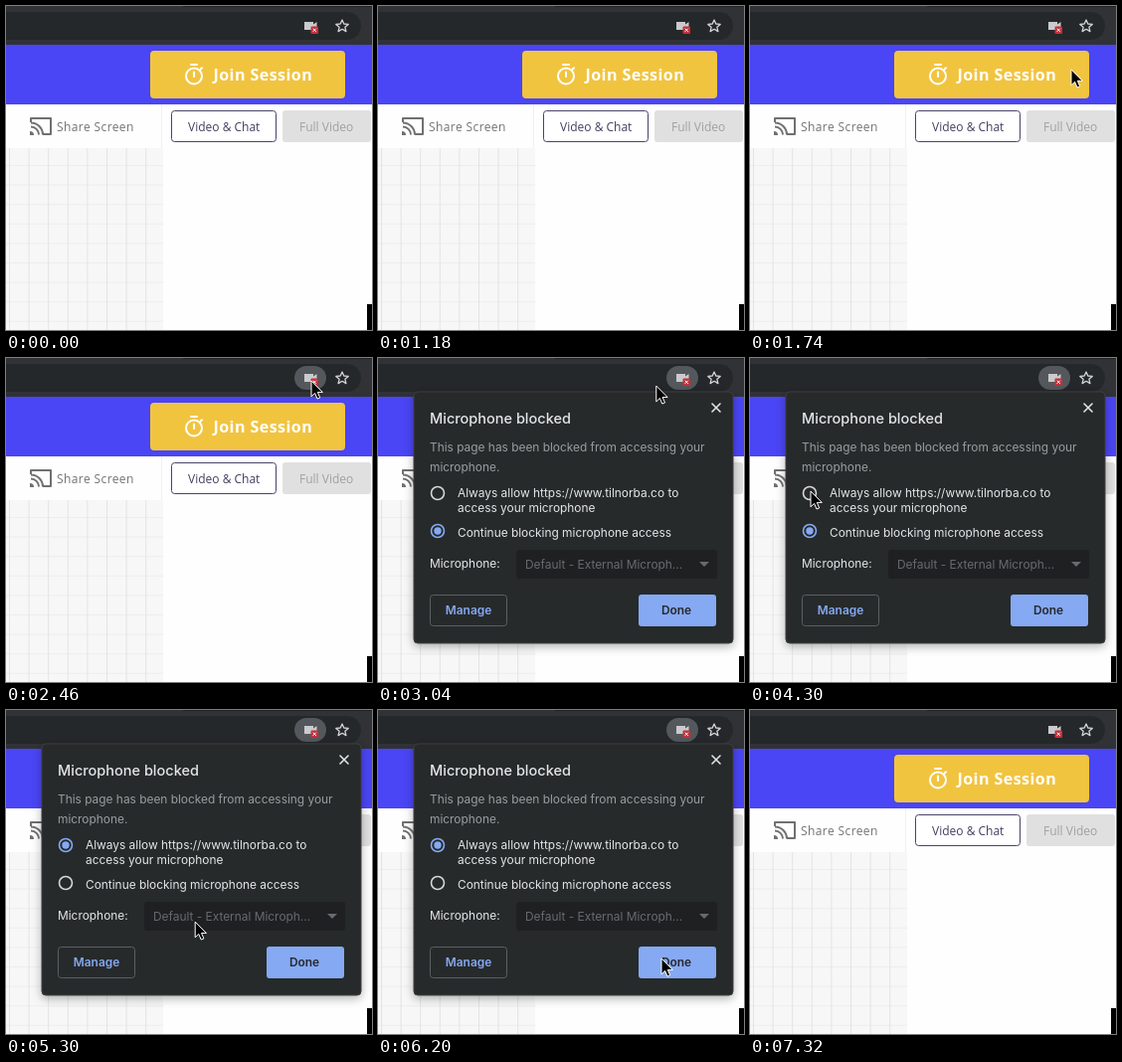
Write an HTML page that moves like this. It is 368 px wide and 326 px high and loops after 8740 ms.

```html
<!DOCTYPE html>
<html lang="en">
<head>
<meta charset="utf-8">
<title>Microphone permission</title>
<style>
html, body { margin: 0; width: 100%; height: 100%; overflow: hidden; background: #fff; }
svg { display: block; }
.page { font: 12px "Open Sans", sans-serif; }
.dialog { font: 11.9px Inter, "Liberation Sans", sans-serif; fill: #e4e6e9; }
.line { fill: none; stroke-linecap: round; stroke-linejoin: round; }
</style>
</head>
<body>
<svg width="368" height="326" viewBox="0 0 368 326">
  <defs>
    <pattern id="grid" x="3" y="140.4" width="19.6" height="19.6" patternUnits="userSpaceOnUse">
      <path d="M.5 0V19.6M0 .1H19.6" stroke="#e3e3e3"/>
    </pattern>
    <filter id="shadow" x="-20%" y="-20%" width="140%" height="140%">
      <feDropShadow dx="0" dy="3" stdDeviation="5" flood-opacity=".3"/>
    </filter>
  </defs>

  <g class="page">
    <rect width="368" height="326" fill="#fefefe"/>
    <rect y="143" width="158" height="183" fill="#f7f7f7"/>
    <rect y="143" width="158" height="183" fill="url(#grid)"/>
    <path d="M156.5 99V143" stroke="#f0f0f0"/>
    <rect y="38" width="368" height="61" fill="#4a45f5"/>
    <rect width="368" height="39" fill="#303236"/>
    <rect x="-20" y="6" width="377" height="28" rx="14" fill="#25282a"/>
    <path d="M178 .5H368" stroke="#1f2123"/>

    <rect x="145" y="45" width="196" height="48" rx="4" fill="#f1c440"/>
    <g class="line" stroke="#fff" stroke-width="2">
      <circle cx="189" cy="70.5" r="8"/>
      <path d="M186 59H192M189 66.5V71M195.3 64L197 62.3"/>
    </g>
    <text x="208.500" y="75" font-size="16" font-weight="700" letter-spacing=".45" fill="#fff">Join Session</text>

    <g class="line" stroke="#707070" stroke-width="2" style="stroke-linecap:butt">
      <path d="M25 117V113H45V129H37M25 121.500A8 8 0 0 1 33 129.500M25 117.500A12 12 0 0 1 37 129.500"/>
    </g>
    <path d="M24 126A4 4 0 0 1 28 130H24Z" fill="#707070"/>
    <text x="51" y="126" letter-spacing=".4" fill="#737373">Share Screen</text>

    <rect x="166.500" y="105.500" width="105" height="31" rx="3" fill="#fff" stroke="#45436b"/>
    <text x="183" y="126" fill="#434160">Video &amp; Chat</text>
    <rect x="278" y="105" width="89" height="32" rx="3" fill="#e0e0e0"/>
    <text x="295" y="126" fill="#a0a0a0">Full Video</text>
    <rect x="363" y="300" width="5" height="26"/>
  </g>

  <rect id="halo" x="290" y="8" width="32" height="24" rx="12" fill="#54575b"/>
  <path d="M300 16H309V18.500L312.500 16V24L309 22V24H300Z" fill="#c9cbce"/>
  <rect x="306.500" y="20.500" width="7.500" height="7.500" rx="1" fill="#c9303a"/>
  <path d="M308.700 22.700L311.800 25.800M311.800 22.700L308.700 25.800" stroke="#fff"/>
  <path class="line" d="M338 14L339.800 18 344.200 18.400 340.900 21.300 341.900 25.600 338 23.300 334.100 25.600 335.100 21.300 331.800 18.400 336.200 18Z" stroke="#d3d5d8" stroke-width="1.300"/>

  <g id="dialog" class="dialog">
    <rect x="36" y="34" width="321" height="253" rx="4" fill="#26292c" stroke="#3b3e41" filter="url(#shadow)"/>
    <path class="line" d="M336 46L344 54M344 46L336 54" stroke="#e4e6e9" stroke-width="1.600"/>
    <text x="52" y="66" font-size="14.500" font-weight="500">Microphone blocked</text>
    <g fill="#989da2">
      <text x="52" y="94">This page has been blocked from accessing your</text>
      <text x="52" y="114">microphone.</text>
    </g>
    <text x="80" y="140">Always allow https://www.tilnorba.co to</text>
    <text x="80" y="155">access your microphone</text>
    <text x="80" y="180">Continue blocking microphone access</text>
    <g fill="none" stroke-width="1.600">
      <circle id="allowRing" cx="60" cy="136" r="6.500"/>
      <circle id="blockRing" cx="60" cy="174" r="6.500"/>
    </g>
    <circle id="allowDot" cx="60" cy="136" r="3.700" fill="#86a9f3"/>
    <circle id="blockDot" cx="60" cy="174" r="3.700" fill="#86a9f3"/>
    <text x="52" y="211">Microphone:</text>
    <rect x="139" y="193" width="202" height="29" rx="3" fill="#1e2022"/>
    <text x="148" y="212" fill="#686b6e">Default - External Microph...</text>
    <path d="M323 205H333L328 210Z" fill="#686b6e"/>
    <rect x="52.500" y="238.500" width="77" height="31" rx="3" fill="none" stroke="#5c6064"/>
    <text x="91" y="258" text-anchor="middle" font-weight="600" fill="#86a9f3">Manage</text>
    <rect x="262" y="238" width="78" height="32" rx="3" fill="#86a9f3"/>
    <text x="300" y="258" text-anchor="middle" font-weight="600" fill="#25282c">Done</text>
  </g>

  <path id="cursor" d="M0 0V15.800L3.600 12.400 6 18 8.700 16.900 6.300 11.400H11.300Z" fill="#000" stroke="#fff" stroke-linejoin="round"/>
</svg>

<script>
const LOOP = 8740;
const el = id => document.getElementById(id);
const [halo, dialog, cursor, allowRing, allowDot, blockRing, blockDot] =
  ["halo", "dialog", "cursor", "allowRing", "allowDot", "blockRing", "blockDot"].map(el);

// Cursor tip: time, x, y
const path = [
  [1160, 371, 246], [1740, 323, 64], [2040, 320, 37], [2460, 307, 23],
  [2900, 307, 23], [3040, 280, 28], [3760, 84, 127], [4040, 66, 134],
  [4200, 66, 134], [4300, 61, 134], [4500, 61, 134], [5300, 190, 213],
  [5360, 204, 217], [6060, 285, 250], [7200, 285, 250], [7320, 371, 285]
];

const clamp = v => Math.max(0, Math.min(1, v));
const ramp = (t, from, to) => clamp((t - from) / (to - from));

function slope(i, axis) {
  const a = path[i], b = path[i + 1];
  return a && b ? (b[axis] - a[axis]) / (b[0] - a[0]) : 0;
}

function tangent(i, axis) {
  const before = slope(i - 1, axis), after = slope(i, axis);
  return before * after > 0 ? 2 * before * after / (before + after) : 0;
}

// Monotone cubic interpolation, which keeps the rests still
function along(t, axis) {
  let i = 0;
  while (i < path.length - 2 && t >= path[i + 1][0]) i++;
  const a = path[i], b = path[i + 1], span = b[0] - a[0], u = ramp(t, a[0], b[0]);
  const ease = u * u * (3 - 2 * u);
  return a[axis] + (b[axis] - a[axis]) * ease
    + span * u * (1 - u) * ((1 - u) * tangent(i, axis) - u * tangent(i + 1, axis));
}

function setRadio(ring, dot, on) {
  ring.setAttribute("stroke", on > .5 ? "#86a9f3" : "#d5d7da");
  dot.setAttribute("opacity", on);
}

function draw(t) {
  const closing = ramp(t, 6300, 6560);
  dialog.setAttribute("opacity", ramp(t, 2580, 2700) * (1 - closing));
  halo.setAttribute("opacity", ramp(t, 2240, 2380) * (1 - closing));
  const allowed = ramp(t, 4500, 4600);
  setRadio(allowRing, allowDot, allowed);
  setRadio(blockRing, blockDot, 1 - allowed);
  cursor.setAttribute("visibility", t >= 1180 && t < 7320 ? "visible" : "hidden");
  cursor.setAttribute("transform", `translate(${along(t, 1)} ${along(t, 2)})`);
}

const start = performance.now();
function tick() {
  draw((performance.now() - start) % LOOP);
  requestAnimationFrame(tick);
}
tick();
</script>
</body>
</html>
```
